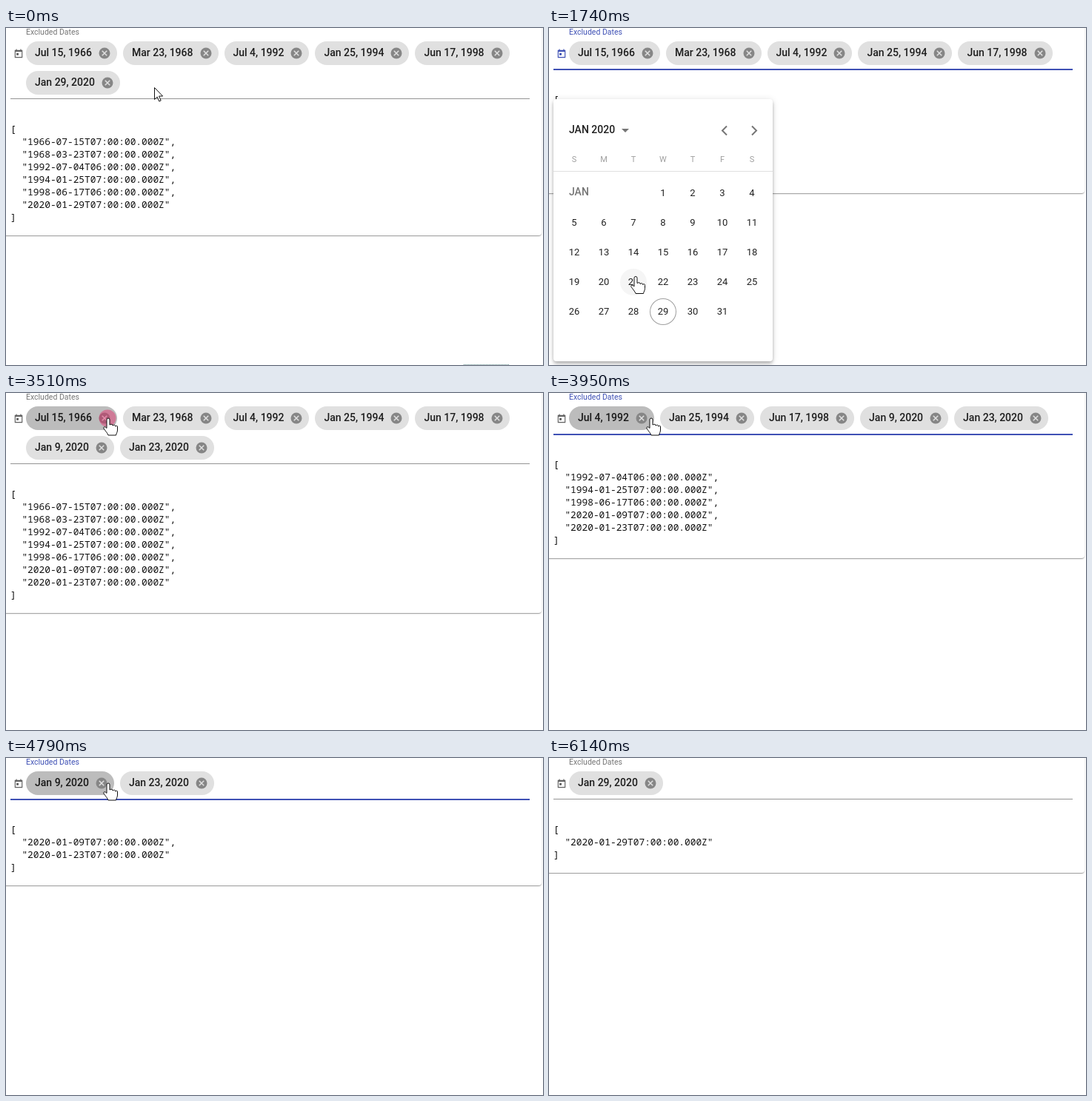
Recreate the animation shown at these times as an HTML page. Size 725 by 455 pixels, loop 7140 ms.

```html
<!DOCTYPE html>
<html lang="en">
<head>
<meta charset="utf-8">
<title>Excluded dates picker</title>
<style>
html, body { margin: 0; width: 100%; height: 100%; overflow: hidden; background: #fff; }
#stage { position: relative; width: 725px; height: 455px; overflow: hidden; font: 14px/20px Roboto, sans-serif; color: rgba(0,0,0,.87); }
#stage > *, #popup > * { position: absolute; }
#card { left: -20px; top: -20px; width: 743px; border-radius: 4px; background: #fff;
  box-shadow: 0 2px 1px -1px rgba(0,0,0,.2), 0 1px 1px rgba(0,0,0,.14), 0 1px 3px rgba(0,0,0,.12); }
#label { left: 27px; white-space: nowrap; }
#icon { left: 10px; width: 14px; height: 14px; fill: none; stroke-width: 2; }
#chips { left: 27px; top: 18px; width: 681px; display: flex; flex-wrap: wrap; gap: 8px; }
.chip { display: flex; align-items: center; height: 32px; padding: 0 8px 2px 12px; border-radius: 16px; box-sizing: border-box;
  background: #e0e0e0; font-weight: 500; white-space: nowrap; }
.chip.focus { background: #bcbcbc; }
.chip svg { width: 18px; height: 18px; margin: 2px 0 0 8px; }
#line { left: 6px; width: 701px; height: 1px; background: #949494; }
#ripple { left: 6px; width: 701px; height: 2px; }
#code { margin: 0; left: 6px; font: 12.83px/17px "Noto Sans Mono", monospace; color: #111; }
#dots { left: 618px; top: 454px; width: 61px; border-top: 1px dotted #5f8a8a; }
#popup { left: 6px; width: 296px; height: 354px; background: #fff; border-radius: 4px; transform-origin: top;
  box-shadow: 0 2px 4px -1px rgba(0,0,0,.2), 0 4px 5px rgba(0,0,0,.14), 0 1px 10px rgba(0,0,0,.12); }
#popup svg { left: 0; top: 0; fill: none; stroke: #757575; stroke-width: 2; }
.month { left: 21px; font-weight: 500; }
.cell { width: 36px; height: 36px; border-radius: 50%; text-align: center; font-size: 13px; line-height: 36px; }
.head { font-size: 11px; color: rgba(0,0,0,.38); }
.rule { top: 97px; width: 100%; height: 1px; background: #e0e0e0; }
.today { box-shadow: inset 0 0 0 1px rgba(0,0,0,.38); }
.hover { background: #f5f5f5; }
.on { background: #3f51b5; color: #fff; font-weight: 500; }
.on.today { box-shadow: inset 0 0 0 1px #3f51b5, inset 0 0 0 2px #fff; }
#pointer { left: 0; top: 0; }
</style>
</head>
<body>
<div id="stage">
  <div id="card"></div>
  <div id="label">Excluded Dates</div>
  <svg id="icon" viewBox="0 0 24 24"><path d="M4 4h16v16H4zM4 6h16M7 1v4M17 1v4M7 12.5h5"/><path d="M7 12.5h5" stroke-width="5"/></svg>
  <div id="chips"></div>
  <div id="line"></div>
  <div id="ripple"></div>
  <pre id="code"></pre>
  <div id="dots"></div>
  <div id="popup">
    <div class="month" style="top:31px">JAN 2020</div>
    <svg width="296" height="80"><path d="M92 40h10l-5 5z" fill="#757575" stroke="none"/><path d="M234 36.5l-6 6 6 6M268 36.5l6 6-6 6"/></svg>
    <div class="rule"></div>
    <div class="month" style="top:115px;color:rgba(0,0,0,.54)">JAN</div>
  </div>
  <svg id="pointer" width="725" height="455">
    <circle id="tap" r="11.5" fill="rgba(233,30,99,.42)"/>
    <path id="cursor" fill="#fff" stroke="#111" stroke-linejoin="round"/>
  </svg>
</div>
<script>
const $ = id => document.getElementById(id);
const LOOP = 7140;
const MONTHS = 'Jan Feb Mar Apr May Jun Jul Aug Sep Oct Nov Dec'.split(' ');
const BASE = ['1966-07-15T07', '1968-03-23T07', '1992-07-04T06', '1994-01-25T07', '1998-06-17T06'];
const ARROW = 'M.5.5V16.5l3.7-3.5 2.6 6 2.4-1-2.6-6h5z';
const HAND = 'M-2 13.5V2a2 2 0 0 1 4 0V9q4-2 4 1 3.5-2 3.5 1 3-2 3 1v4c0 3-1.5 4-2 7H0c-1-3-4-6-6-9-1-2 1.5-3.5 4-.5z';
const CANCEL = '<svg viewBox="0 0 24 24"><circle cx="12" cy="12" r="10" fill="#868686"/><path d="M7.7 7.7l8.6 8.6m0-8.6l-8.6 8.6" stroke="#e0e0e0" stroke-width="2"/></svg>';

// Clicks on the first chip come at a steady beat; the chip goes when the press ends.
const CLEAR = 3510, CLEARED = 5280, BEAT = 280, PRESS = 80;
const FOCUS = [[1000, 3340], [CLEAR + PRESS, CLEARED], [CLEARED, 6070]];

const clamp = v => Math.max(0, Math.min(1, v));
const ramp = (t, start, length) => clamp((t - start) / length);
const within = (t, ...spans) => spans.some(([a, b]) => t >= a && t < b);
const jan = d => `2020-01-${String(d).padStart(2, '0')}T07`;
const popupTop = t => t < 4000 ? 96 : 39;

function dayPoint(d) {
  const slot = d + 2;
  return [28 + 40 * (slot % 7), 126.5 + 40 * Math.floor(slot / 7)];
}

function onDay(at, d) {
  const [x, y] = dayPoint(d);
  return [at, x + 9, y + popupTop(at) - 7];
}
const STOPS = [[0, 200, 80], onDay(1240, 29), onDay(1740, 21), onDay(1790, 9), onDay(2290, 23),
  [2840, 369, 258], [CLEAR, 138, 34], [CLEARED, 149, 28], onDay(5490, 29)];

// Rest at each stop, then glide briefly to reach the next one on time.
function pointerAt(t) {
  const next = STOPS.findIndex(s => s[0] > t);
  if (next < 0) return STOPS.at(-1).slice(1);
  const [t0, x0, y0] = STOPS[next - 1], [t1, x1, y1] = STOPS[next];
  const start = Math.max(t0 + 50, t1 - 80);
  const f = t > start ? ramp(t, start, t1 - start) : 0;
  return [x0 + (x1 - x0) * f, y0 + (y1 - y0) * f];
}

function datesAt(t) {
  if (t < 1740) return [...BASE, jan(29)];
  if (t < 1790) return BASE;
  if (t < 2290) return [...BASE, jan(9)];
  if (t >= 5740) return [jan(29)];
  const removed = Math.max(0, Math.floor((t - CLEAR - PRESS) / BEAT) + 1);
  return [...BASE, jan(9), jan(23)].slice(removed);
}

function chipText(date) {
  const [y, m, d] = date.slice(0, 10).split('-');
  return `${MONTHS[m - 1]} ${+d}, ${y}`;
}

function addCell(text, [x, y], cls) {
  const el = document.createElement('div');
  el.className = 'cell ' + cls;
  el.textContent = text;
  el.style.cssText = `left:${x - 18}px;top:${y - 18}px`;
  $('popup').append(el);
  return el;
}
[...'SMTWTFS'].forEach((s, i) => addCell(s, [28 + 40 * i, 82], 'head'));
const days = Array.from({ length: 31 }, (_, i) => addCell(i + 1, dayPoint(i + 1), ''));

function drawField(t, dates) {
  const n = dates.length, base = n > 5 ? 95 : n ? 55 : 38;
  const focus = FOCUS.find(span => within(t, span));
  const grow = focus ? clamp(.5 + (t - focus[0]) / 240) : 0;
  const float = n ? 1 : ramp(t, CLEARED, 148);

  $('chips').innerHTML = dates.map((d, i) =>
    `<div class="chip${!i && within(t, [CLEAR, CLEARED]) ? ' focus' : ''}">${chipText(d)}${CANCEL}</div>`).join('');
  $('code').textContent = n ? `[\n${dates.map(d => `  "${d}:00:00.000Z"`).join(',\n')}\n]` : '[]';
  $('code').style.top = base + 33 + 'px';
  $('card').style.height = base + 86 + 17 * (n ? n + 1 : 0) + 'px';
  $('line').style.top = $('ripple').style.top = base + 'px';
  $('ripple').style.transform = `scaleX(${grow})`;
  $('ripple').style.background = grow < 1 ? '#1f2766' : '#3f51b5';
  $('icon').style.top = (n ? 28 : 23.5) + 'px';
  $('icon').style.stroke = within(t, [1080, 3340], [5410, 6070]) ? '#3f51b5' : '#616161';
  const label = $('label').style;
  label.top = 16 - 20.5 * float + 'px';
  label.fontSize = 14 - 3.5 * float + 'px';
  label.color = !focus ? 'rgba(0,0,0,.54)' : grow < 1 ? '#85839a' : '#3f51b5';
}

function drawPopup(t, dates) {
  const alpha = ramp(t, 1000, 160) - ramp(t, 3320, 70) + ramp(t, 5400, 90) - ramp(t, 5970, 150);
  const popup = $('popup').style;
  popup.top = popupTop(t) + 'px';
  popup.opacity = alpha;
  popup.transform = `scaleY(${.8 + .2 * alpha})`;
  days.forEach((el, i) => {
    const day = i + 1;
    el.classList.toggle('today', day === 29);
    el.classList.toggle('hover', day === 21 && within(t, [1740, 1790]));
    el.classList.toggle('on', dates.includes(jan(day)));
  });
}

function drawPointer(t) {
  const [x, y] = pointerAt(t);
  const hand = within(t, [1240, 2760], [CLEAR, CLEARED], [5490, 6070]);
  const pressing = within(t, [CLEAR, CLEARED]) && (t - CLEAR) % BEAT < PRESS;
  const tapped = pressing || within(t, [1000, 1080], [1790, 2760], [2840, 3340], [5740, 5990]);
  $('cursor').setAttribute('d', hand ? HAND : ARROW);
  $('cursor').setAttribute('transform', `translate(${x} ${y})`);
  $('tap').setAttribute('transform', `translate(${x - 1} ${y})`);
  $('tap').style.opacity = +tapped;
  $('pointer').style.opacity = +(t < 6070);
}

function frame() {
  const t = performance.now() % LOOP;
  const dates = datesAt(t);
  drawField(t, dates);
  drawPopup(t, dates);
  drawPointer(t);
  $('dots').style.opacity = +(t < 1000);
  requestAnimationFrame(frame);
}
frame();
</script>
</body>
</html>
```
